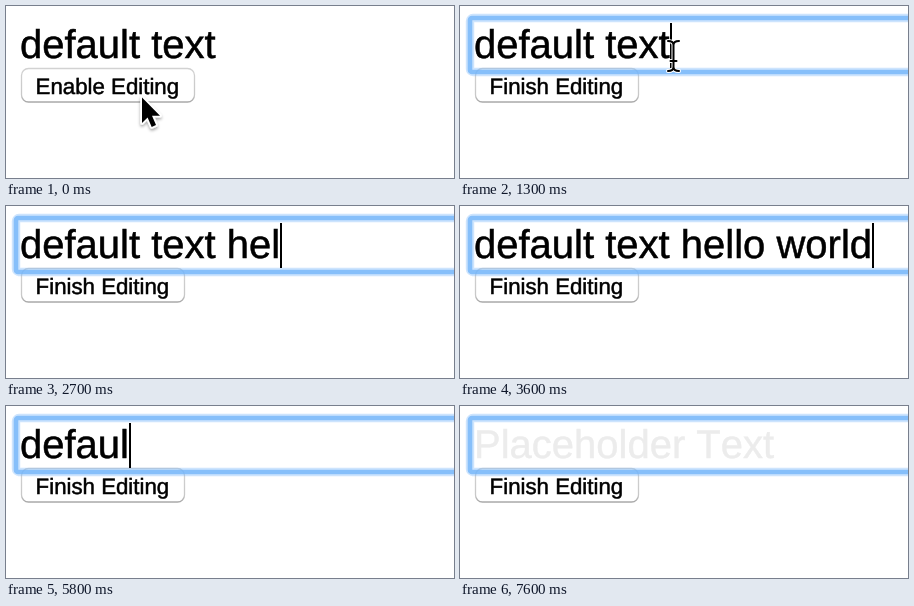
An HTML page that plays this animation: 448x172 px, repeating every 8000 ms.

```html
<!DOCTYPE html>
<html lang="en">
<head>
<meta charset="utf-8">
<title>Inline editing</title>
<style>
  html, body { margin: 0; width: 100%; height: 100%; overflow: hidden; background: #fff; }
  svg { display: block; width: 448px; height: 172px; }
  text {
    font-family: "Liberation Sans", Helvetica, Arial, sans-serif;
    font-kerning: none;
    text-rendering: geometricPrecision;
    stroke-width: .5px;
  }
  .field { font-size: 40px; }
  .label { font-size: 22.25px; }
  .ink { fill: #000; stroke: #000; }
  .pale { fill: #ececec; stroke: #ececec; }
  .hidden { display: none; }
</style>
</head>
<body>
<svg viewBox="0 0 448 172">
  <defs>
    <linearGradient id="edge" x1="0" y1="0" x2="0" y2="1">
      <stop offset="0" stop-color="#d2d2d2"/>
      <stop offset=".8" stop-color="#c8c8c8"/>
      <stop offset="1" stop-color="#a8a8a8"/>
    </linearGradient>
    <filter id="shadow" x="-50%" y="-50%" width="200%" height="200%">
      <feDropShadow dx="0" dy="2" stdDeviation="1.6" flood-color="#000" flood-opacity=".35"/>
    </filter>
    <path id="beamShape" d="M-5.5-15Q0-15 0-11Q0-15 5.5-15M0-11V11M-5.5 15Q0 15 0 11Q0 15 5.5 15M-3 5H3"/>
  </defs>

  <rect id="button" x="15.5" y="62.5" height="33.5" rx="7" fill="#fff" stroke="url(#edge)" stroke-width="1.3"/>
  <text id="label" class="label ink" x="29.6" y="88"></text>

  <g id="ring" fill="none" stroke="#6fb3fa">
    <rect x="10" y="12" width="480" height="54" rx="3" stroke-width="8.4" stroke-opacity=".35"/>
    <rect x="10" y="12" width="480" height="54" rx="2" stroke-width="4.6" stroke-opacity=".75"/>
  </g>
  <text id="placeholder" class="field pale" x="14" y="52">Placeholder Text</text>
  <text id="value" class="field ink" x="14" y="52" xml:space="preserve"></text>
  <rect id="caret" y="17" width="2" height="45"/>

  <g id="arrow" filter="url(#shadow)">
    <path d="M0 0V25.5L5.6 20 9.7 29.4 14 27.5 10 18.3H18Z" stroke="#fff" stroke-width="3.6" stroke-linejoin="round" paint-order="stroke"/>
  </g>
  <g id="beam" fill="none" stroke-linecap="round">
    <use href="#beamShape" stroke="#fff" stroke-width="4"/>
    <use href="#beamShape" stroke="#000" stroke-width="2"/>
  </g>
</svg>
<script>
const LOOP = 8000, STEP = 100;
const FULL = "default text hello world", INITIAL = "default text".length;
const CLICK = 700, FOCUS = 900, HIDE_POINTER = 2300;

const el = id => document.getElementById(id);
const show = (id, on) => el(id).classList.toggle("hidden", !on);
const ramp = (t, from, to) => Math.min(1, Math.max(0, (t - from) / (to - from)));
const ease = p => p * p * (3 - 2 * p);

// Bursts of typing, one deletion, then held backspace that slows down
function charCount(t) {
  const typed = 4 * ramp(t, 2300, 2700) + ramp(t, 2800, 2900) + 7 * ramp(t, 3000, 3600);
  const erased = ramp(t, 3800, 3900) + 17 * ramp(t, 4400, 5800) + 6 * ramp(t, 5800, 7000);
  return Math.round(INITIAL + typed - erased);
}

function pointerAt(t) {
  const toButton = ease(ramp(t, 0, 400));
  const toField = ease(ramp(t, 900, 1300));
  const away = ease(ramp(t, 1400, 1800));
  return [
    136 - 8 * toButton + 85.5 * toField + 130 * away,
    91.5 - 9 * toButton - 32.5 * toField + 57 * away
  ];
}

function draw(t) {
  const editing = t >= FOCUS, clicked = t >= CLICK;
  const count = charCount(t);

  el("label").textContent = clicked ? "Finish Editing" : "Enable Editing";
  el("button").setAttribute("width", clicked ? 163 : 173);

  el("value").textContent = FULL.slice(0, count);
  const width = count ? el("value").getComputedTextLength() : 0;
  el("caret").setAttribute("x", Math.round(14 + width));
  show("ring", editing);
  show("caret", editing && count > 0);
  show("placeholder", count === 0);

  const [x, y] = pointerAt(t);
  const visible = t < HIDE_POINTER, overField = editing && y < 68;
  for (const id of ["arrow", "beam"]) el(id).setAttribute("transform", `translate(${x} ${y})`);
  show("arrow", visible && !overField);
  show("beam", visible && overField);
}

const start = performance.now();
let last = -1;
function tick() {
  const t = Math.floor(((performance.now() - start) % LOOP) / STEP) * STEP;
  if (t !== last) draw(last = t);
  requestAnimationFrame(tick);
}
tick();
</script>
</body>
</html>
```
